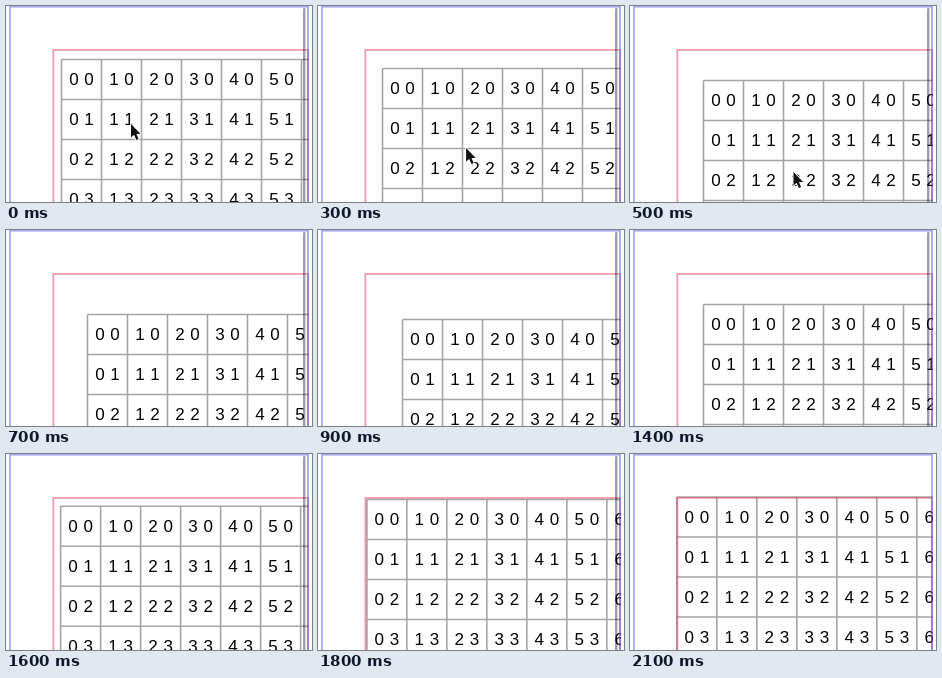
An HTML page with a canvas that plays this animation: 306 by 196 pixels, repeating every 2400 ms.

```html
<!DOCTYPE html>
<html>
<head>
<meta charset="utf-8">
<style>
  html, body { margin: 0; width: 306px; height: 196px; overflow: hidden; background: #fff; }
  canvas { display: block; }
</style>
</head>
<body>
<canvas id="stage" width="306" height="196"></canvas>
<script>
const c = document.getElementById('stage').getContext('2d');
const LOOP = 2400, STEP = 100, CELL = 40, RELEASE = 1400;
const arrowShape = new Path2D('M0 0V13.5L3.1 10.8L5.4 16L7.6 15L5.4 9.9H9.6Z');

// Cubic from 0 to 1 that starts with the given slope and ends at rest.
const settle = (u, slope) => u * (slope + u * (3 - 2 * slope + u * (slope - 2)));

// Rubber-band pull, then an exponential spring back.
function gridPos(t) {
  if (t < RELEASE) {
    const u = Math.min(1, t / 900);
    return [55.5 + Math.round(29 * settle(u, 0.34)), 53.5 + Math.round(36 * settle(u, 0))];
  }
  const k = 0.55 ** ((t - RELEASE) / 100);
  return [46.4 + 27.1 * k, 42.5 + 32 * k];
}

function pointerPos(t) {
  const s = t / 1000;
  return [125 + 77 * s, 118 + 57 * s + 78 * s * s];
}

function line(x1, y1, x2, y2) {
  c.beginPath();
  c.moveTo(x1, y1);
  c.lineTo(x2, y2);
  c.stroke();
}

function grid(x, y) {
  c.strokeStyle = '#a4a4a4';
  c.lineWidth = 1.6;
  c.fillStyle = '#000';
  c.font = '17px "Liberation Sans", Arial, sans-serif';
  c.wordSpacing = '1px';
  c.textAlign = 'center';
  for (let i = 0; i < 7; i++) {
    line(x + i * CELL, y, x + i * CELL, 200);
    line(x, y + i * CELL, 306, y + i * CELL);
    for (let j = 0; j < 4; j++)
      c.fillText(i + ' ' + j, x + i * CELL + 20, y + j * CELL + 25.8);
  }
}

function frame(x, y, w, color) {
  c.strokeStyle = color;
  c.lineWidth = 1.8;
  c.strokeRect(x, y, w, 300);
}

function arrow(x, y) {
  c.save();
  c.translate(x, y);
  c.lineJoin = 'round';
  c.lineWidth = 2;
  c.strokeStyle = '#fff';
  c.stroke(arrowShape);
  c.fillStyle = '#111';
  c.fill(arrowShape);
  c.restore();
}

function draw(now) {
  const t = Math.floor(now % LOOP / STEP) * STEP;
  c.fillStyle = '#fff';
  c.fillRect(0, 0, 306, 196);

  c.save();
  c.beginPath();
  c.rect(3, 0, 300, 196);
  c.clip();
  grid(...gridPos(t));
  frame(47.4, 43.9, 254.6, 'rgba(225,50,70,.47)');
  c.restore();
  frame(3.9, 0.7, 298.1, 'rgba(60,60,230,.45)');

  const fade = Math.min(1, Math.max(0, (2100 - t) / 200));
  c.fillStyle = `rgba(0,0,0,${0.38 * fade})`;
  c.beginPath();
  c.roundRect(297, 2, 2.4, 220, 1.2);
  c.fill();

  if (t < RELEASE) arrow(...pointerPos(t));
  requestAnimationFrame(draw);
}
draw(0);
</script>
</body>
</html>
```
